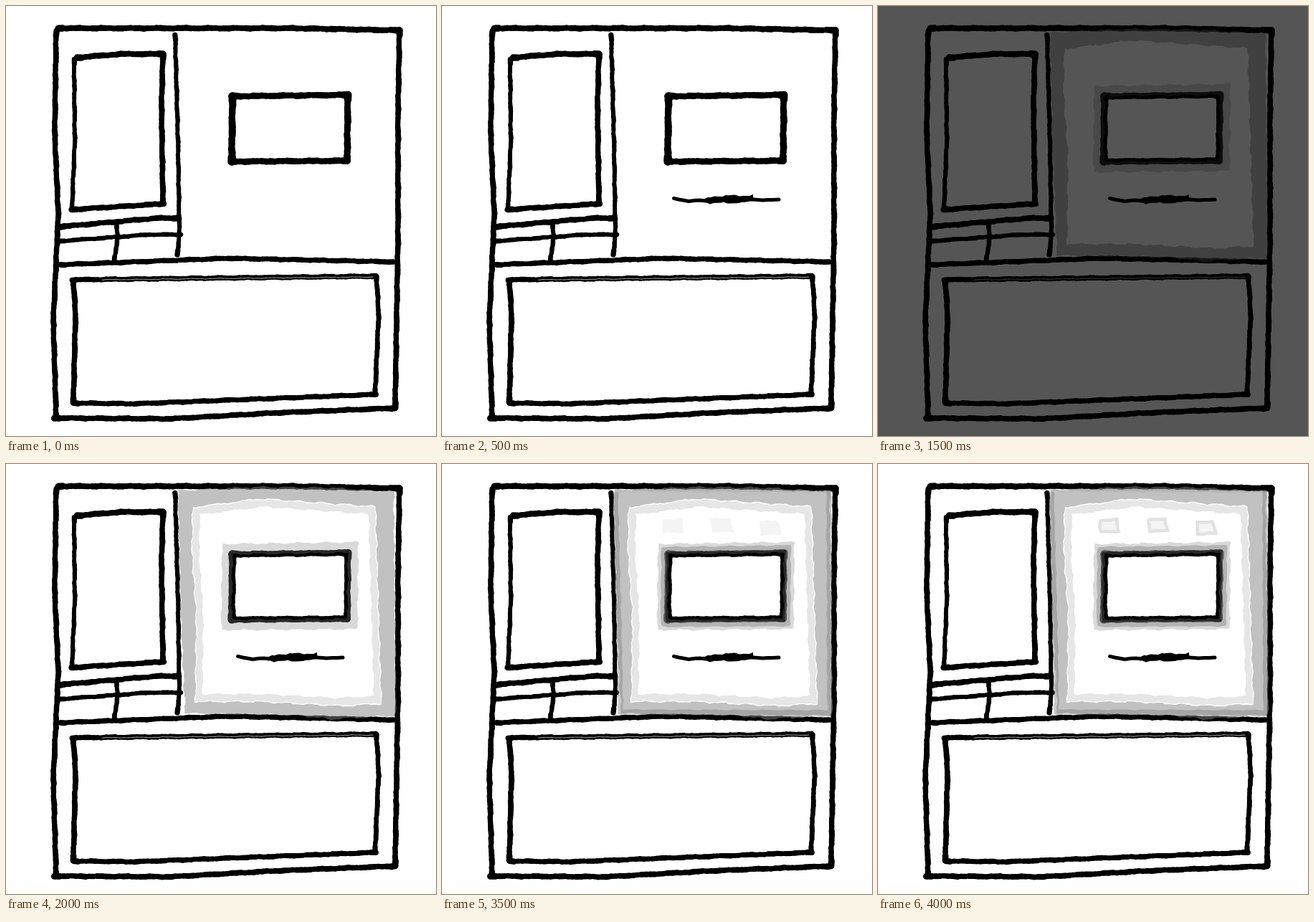
Write an HTML page with a canvas that moves like this. It is 600 by 600 pixels and loops after 4.5 s.

```html
<!DOCTYPE html>
<html lang="en">
<head>
<meta charset="utf-8">
<title>Oven sketch</title>
<style>
html, body { margin: 0; width: 100%; height: 100%; overflow: hidden; background: #fff; }
canvas { display: block; width: 100vw; height: 100vh; }
</style>
</head>
<body>
<canvas id="stage" width="600" height="600"></canvas>
<script>
const ctx = document.getElementById('stage').getContext('2d');
const LOOP = 4500;
const BEAT = 500;
const grey = a => `rgba(131,131,131,${a})`;

const parse = text => text.split(' ').map(p => p.split(',').map(Number));

// Repeatable wobble that depends on position only
const wobble = (x, y) => Math.sin(x * .21 + y * .17) * .6 + Math.sin(x * .53 - y * .47) * .4;

const scale = (pts, cx, cy, kx, ky = kx) =>
  pts.map(([x, y]) => [cx + (x - cx) * kx, cy + (y - cy) * ky]);

// Splits a polyline into short, slightly shaky steps
function rough(pts, step, amp, closed) {
  const out = [], ends = closed ? [...pts, pts[0]] : pts;
  for (let i = 1; i < ends.length; i++) {
    const [ax, ay] = ends[i - 1], [bx, by] = ends[i];
    const n = Math.max(1, Math.round(Math.hypot(bx - ax, by - ay) / step));
    for (let k = 0; k < n; k++) {
      const x = ax + (bx - ax) * k / n, y = ay + (by - ay) * k / n;
      out.push([x + amp * wobble(x, y), y + amp * wobble(y, x)]);
    }
  }
  if (!closed) out.push(ends[ends.length - 1]);
  return out;
}

// Ink line of uneven width with a blob at each end
function pen(width, text, color = '#000') {
  const pts = rough(parse(text), 6, .6);
  ctx.strokeStyle = color;
  for (let i = 1; i < pts.length; i++) {
    const [x, y] = pts[i];
    const end = i === 1 || i === pts.length - 1;
    ctx.lineWidth = width * (1 + .08 * wobble(x, y) + (end ? .15 : 0));
    ctx.beginPath();
    ctx.moveTo(...pts[i - 1]);
    ctx.lineTo(x, y);
    ctx.stroke();
  }
}

// One even, translucent stroke
function marker(width, pts, color, closed) {
  ctx.beginPath();
  rough(pts, 8, 1, closed).forEach(p => ctx.lineTo(...p));
  if (closed) ctx.closePath();
  ctx.strokeStyle = color;
  ctx.lineWidth = width;
  ctx.stroke();
}

// Filled area between uneven outlines
function wash(color, ...outlines) {
  ctx.beginPath();
  for (const outline of outlines) {
    rough(outline, 5, 1.6, true).forEach((p, i) => i ? ctx.lineTo(...p) : ctx.moveTo(...p));
    ctx.closePath();
  }
  ctx.fillStyle = color;
  ctx.fill('evenodd');
}

const pane = parse('316,126 477,124 476,216 315,217');
const aroundPane = (kx, ky) => scale(pane, 396, 171, kx, ky);
const frame = parse('240,37 345,32 455,33 541,39 544,351 455,356 400,350 250,348 244,215');
const opening = parse('260,60 355,48 516,59 520,200 524,335 470,338 350,332 264,332 265,210 259,120');
const lampAt = parse('322,86 390,85 457,89');
const lampShape = parse('-12,-7 10,-9 14,8 -11,9');
const lamp = ([cx, cy], k) => lampShape.map(([x, y]) => [cx + x * k, cy + y * k]);

function cabinet() {
  pen(8, '73,31 400,31 549,34');
  pen(7.5, '70,35 68,180 73,290 66,440 70,575');
  pen(7.5, '549,34 547,150 547,320 543,560');
  pen(7.5, '68,575 230,576 370,568 543,561');
  // Tall door
  pen(8, '99,72 160,67 219,67');
  pen(6, '95,74 96,190 92,283');
  pen(7.5, '92,284 220,276');
  pen(7.5, '219,67 217,140 219,276');
  pen(6, '236,41 240,190 242,320 239,347');
  // Drawers
  pen(7.5, '76,308 210,296 240,296');
  pen(6, '76,328 200,319 244,319');
  pen(6, '154,304 156,320 151,356');
  pen(7, '76,361 310,352 540,357');
  // Lower panel
  pen(7, '92,382 516,377');
  pen(7.5, '94,383 97,430 94,553');
  pen(7, '94,554 180,555 516,542');
  pen(6.5, '517,378 520,430 515,541');
  pen(.8, '135,382 512,378', '#bbb');
  // Oven window
  pen(9.5, '316,126 315,217');
  pen(8.5, '315,126 477,124');
  pen(9, '477,124 476,216');
  pen(8.5, '315,217 476,216');
}

function handle() {
  marker(5, parse('323,269 345,272 470,270'), '#000');
  wash('#000', parse('363,270 380,265 435,264 435,271 404,275 374,275'));
}

function border() {
  wash(grey(.5), frame, opening);
}

function halo() {
  wash(grey(.3), aroundPane(1.18, 1.32), aroundPane(1, 1));
}

function night() {
  ctx.fillStyle = 'rgba(0,0,0,.667)';
  ctx.fillRect(0, 0, 600, 600);
}

function innerRing() {
  wash('#e6e6e6', scale(opening, 391, 194, .99), scale(opening, 391, 194, .92));
}

function shade() {
  marker(7, parse('242,42 248,270 249,346 541,347 540,40'), grey(.45));
  marker(4, parse('243,36 541,38'), grey(.2));
  lampAt.forEach(at => wash('#f4f4f4', lamp(at, 1.2)));
}

function paneShade() {
  marker(7, aroundPane(1.08, 1.15), grey(.45), true);
}

function lampRims() {
  lampAt.forEach(at => marker(4.5, lamp(at, 1), '#e2e2e2', true));
}

function draw(beat) {
  ctx.fillStyle = '#fff';
  ctx.fillRect(0, 0, 600, 600);
  ctx.lineCap = ctx.lineJoin = 'round';
  cabinet();
  if (beat >= 1) handle();
  if (beat >= 2) border();
  if (beat >= 3) halo();
  if (beat === 3) night();
  if (beat >= 4) innerRing();
  if (beat >= 6) shade();
  if (beat >= 7) paneShade();
  if (beat >= 8) lampRims();
}

let start, shown = 0;
function tick(now) {
  start ??= now;
  const beat = Math.floor((now - start) % LOOP / BEAT);
  if (beat !== shown) draw(shown = beat);
  requestAnimationFrame(tick);
}
draw(shown);
requestAnimationFrame(tick);
</script>
</body>
</html>
```
